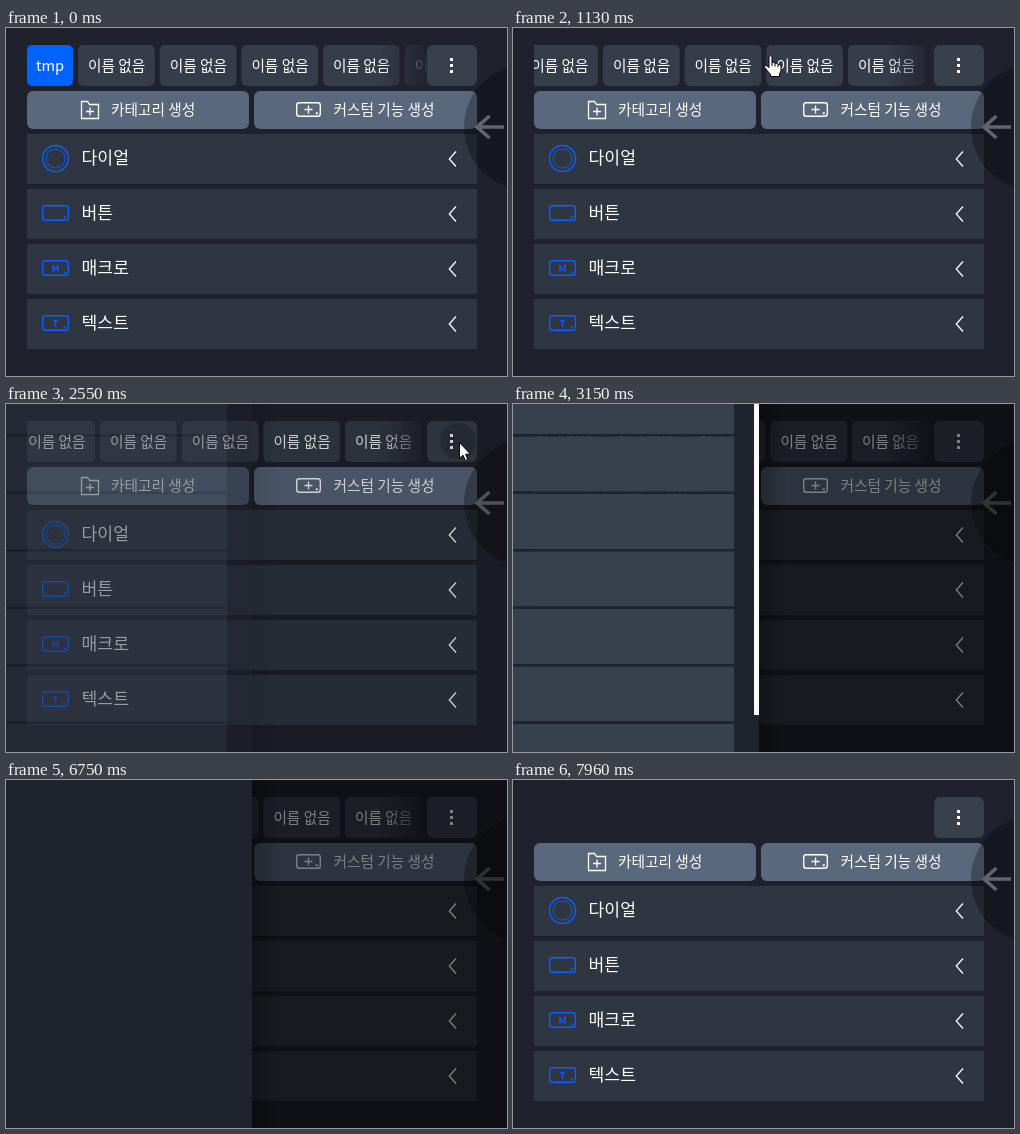
These frames come from a looping animation (501x348 px, 8 s). An HTML page with a canvas:

```html
<!DOCTYPE html>
<html lang="ko">
<head>
<meta charset="utf-8">
<style>
  html, body { margin: 0; width: 100%; height: 100%; overflow: hidden; background: #1f222d; }
  canvas { display: block; }
</style>
</head>
<body>
<canvas id="stage" width="501" height="348"></canvas>
<script>
const c = document.getElementById('stage').getContext('2d');
const LOOP = 8000, BG = '#1f222d', BLUE = '#0a60ff';
const ROWS = ['다이얼', '버튼', '매크로', '텍스트'];
const HAND = 'M5 11V2C5 .1 8 .1 8 2V8C9 6.8 11 7.2 11 8.6C12 7.8 14 8.3 14 9.6C15 9 17 9.6 17 11V15' +
  'C17 17 15.5 18 15.5 19V21.5H6.5V19.5C5 17.5 2.5 15 .8 12.5C0 11 1.6 9.8 3 10.8L5 12.6Z';
const ARROW = 'M.5 .5V16.5L4 13.2L6.4 18.5L8.8 17.5L6.6 12.2H11.5Z';

const ramp = (t, from, to) => Math.min(1, Math.max(0, (t - from) / (to - from)));
const mix = (a, b, u) => a + (b - a) * u;

function rect(x, y, w, h, color, r = 0) {
  c.fillStyle = color;
  c.beginPath();
  c.roundRect(x, y, w, h, r);
  c.fill();
}

function stroke(path, color, width = 1.3) {
  c.strokeStyle = color;
  c.lineWidth = width;
  c.stroke(new Path2D(path));
}

function frame(x, y, w, h, color) {
  c.strokeStyle = color;
  c.lineWidth = 1.4;
  c.beginPath();
  c.roundRect(x, y, w, h, 2.5);
  c.stroke();
  c.fillStyle = color;
  c.fillRect(x + w - 4.5, y + h - 4, 2, 2);
}

function disc(x, y, r, color) {
  c.fillStyle = color;
  c.beginPath();
  c.arc(x, y, r, 0, 7);
  c.fill();
}

function ring(x, y, r, width) {
  c.strokeStyle = BLUE;
  c.lineWidth = width;
  c.beginPath();
  c.arc(x, y, r, 0, 7);
  c.stroke();
}

function text(s, x, y, size, align = 'left', color = '#fff', weight = 400) {
  c.font = `${weight} ${size}px "Noto Sans CJK KR", "Noto Sans CJK", sans-serif`;
  c.textAlign = align;
  c.fillStyle = color;
  c.fillText(s, x, y);
}

function fade(x0, x1, y, h, from, to) {
  const g = c.createLinearGradient(x0, 0, x1, 0);
  g.addColorStop(0, from);
  g.addColorStop(1, to);
  c.fillStyle = g;
  c.fillRect(x0, y, x1 - x0, h);
}

function tabs(t) {
  const shift = 141.4 * ramp(t, 930, 1270) ** 1.5;
  c.save();
  c.beginPath();
  c.rect(21, 17, 402, 41);
  c.clip();
  c.translate(-shift, 0);
  rect(21, 17, 46, 41, '#0062ff', 5);
  text('tmp', 44, 42.5, 14.67, 'center');
  for (let i = 0; i < 6; i++) {
    const x = 72 + i * 81.7;
    rect(x, 17, 76.7, 41, '#363d4a', 5);
    text('이름 없음', x + 38.6, 42.5, 14.67, 'center');
  }
  c.restore();
  fade(373, 424, 17, 41, 'rgba(31,34,45,0)', BG);
}

function menuButton(t) {
  rect(421, 17, 50, 41, '#38404c', 6);
  const grow = ramp(t, 2340, 2550);
  const gone = ramp(t, 2600, 2900);
  if (grow > 0 && gone < 1) {
    c.save();
    c.beginPath();
    c.roundRect(421, 17, 50, 41, 6);
    c.clip();
    disc(452, 37, 18 * grow, `rgba(0,0,0,${0.2 * (1 - gone)})`);
    c.restore();
  }
  for (const y of [30, 36, 42]) rect(444, y, 3, 3, '#fff');
}

function actions() {
  rect(21, 63, 222, 38, '#5a687e', 6);
  rect(248, 63, 223, 38, '#5a687e', 6);
  stroke('M75.5 90.5V73.5H81.5L83.5 76.5H92.5V90.5ZM80 83.5H88M84 79.5V87.5', '#fff');
  text('카테고리 생성', 105, 86.7, 14.67);
  frame(290.7, 74.7, 23.6, 13.6, '#fff');
  stroke('M298.5 81.5H306.5M302.5 77.5V85.5', '#fff');
  text('커스텀 기능 생성', 327.5, 86.7, 14.67);
}

function rows() {
  ROWS.forEach((label, i) => {
    const y = 106 + i * 55;
    rect(21, y, 450, 50, '#2f3641');
    if (i) frame(36.7, y + 16.7, 25.6, 14.6, BLUE);
    else { ring(49.5, y + 24.5, 13, 1.4); ring(49.5, y + 24.5, 9.5, 0.9); }
    if (i > 1) text(i > 2 ? 'T' : 'M', 49.5, y + 27.5, 9.5, 'center', BLUE, 700);
    text(label, 75.5, y + 29.5, 17.2);
    stroke(`M450 ${y + 17.5}L443.3 ${y + 25}L450 ${y + 32.5}`, '#fff');
  });
}

function backButton() {
  disc(521, 99, 63, 'rgba(0,0,0,.29)');
  c.lineJoin = 'miter';
  stroke('M498 99H471M483.5 88L471 99L483.5 110', '#62656c', 3.6);
}

function drawer(t) {
  const p = ramp(t, 2310, 2960) * (1 - ramp(t, 7690, 7960));
  if (!p) return;
  c.fillStyle = `rgba(0,0,0,${0.5 * p})`;
  c.fillRect(0, 0, 501, 348);
  c.globalAlpha = p;
  fade(246, 274, 0, 348, 'rgba(0,0,0,.25)', 'rgba(0,0,0,0)');
  // Items and gaps tile the panel without overlap, so one alpha suits all.
  const full = t < 6750;
  rect(full ? 221 : 0, 0, full ? 25 : 246, 348, '#1f232e');
  if (full) {
    for (let y = -25; y < 348; y += 57.5) {
      rect(0, y, 221, 55, '#37404d');
      rect(0, y + 55, 221, 2.5, '#1f232e');
    }
  }
  c.globalAlpha = ramp(t, 2900, 3080) * (1 - ramp(t, 5950, 6130));
  rect(241, 0, 5, 311, '#fbf9f9');
  c.globalAlpha = 1;
}

function pointer(shape, x, y) {
  const p = new Path2D(shape);
  c.save();
  c.translate(x, y);
  c.fillStyle = '#fff';
  c.fill(p);
  c.strokeStyle = '#000';
  c.lineWidth = 1;
  c.stroke(p);
  if (shape === HAND) c.stroke(new Path2D('M8 8V11M11 8.6V11.5M14 9.6V12'));
  c.restore();
}

function cursor(t) {
  if (t >= 360 && t < 1420) {
    const u = 1 - (1 - ramp(t, 360, 830)) ** 2;
    pointer(HAND, mix(291, 251, u), mix(180, 27, u));
  } else if (t >= 1420 && t < 2370) {
    const k = ramp(t, 1360, 2220), u = k * k * (3 - 2 * k);
    pointer(HAND, mix(251, 447, u), mix(27, 38, u) - 6 * Math.sin(2 * Math.PI * u));
  } else if (t >= 2370 && t < 3150) {
    const u = ramp(t, 2700, 3140) ** 2;
    pointer(ARROW, mix(453, -14, u), mix(38, 308, u));
  } else if (t >= 6960 && t < 7030) {
    pointer(ARROW, 0, 299);
  }
}

function draw(now) {
  const t = now % LOOP;
  c.fillStyle = BG;
  c.fillRect(0, 0, 501, 348);
  if (t < 7760) tabs(t);
  menuButton(t);
  actions();
  rows();
  backButton();
  drawer(t);
  cursor(t);
  requestAnimationFrame(draw);
}

let start;
requestAnimationFrame(function begin(now) {
  start = now;
  draw(0);
});
const tick = draw;
draw = now => tick(Math.max(0, now - start));
</script>
</body>
</html>
```
